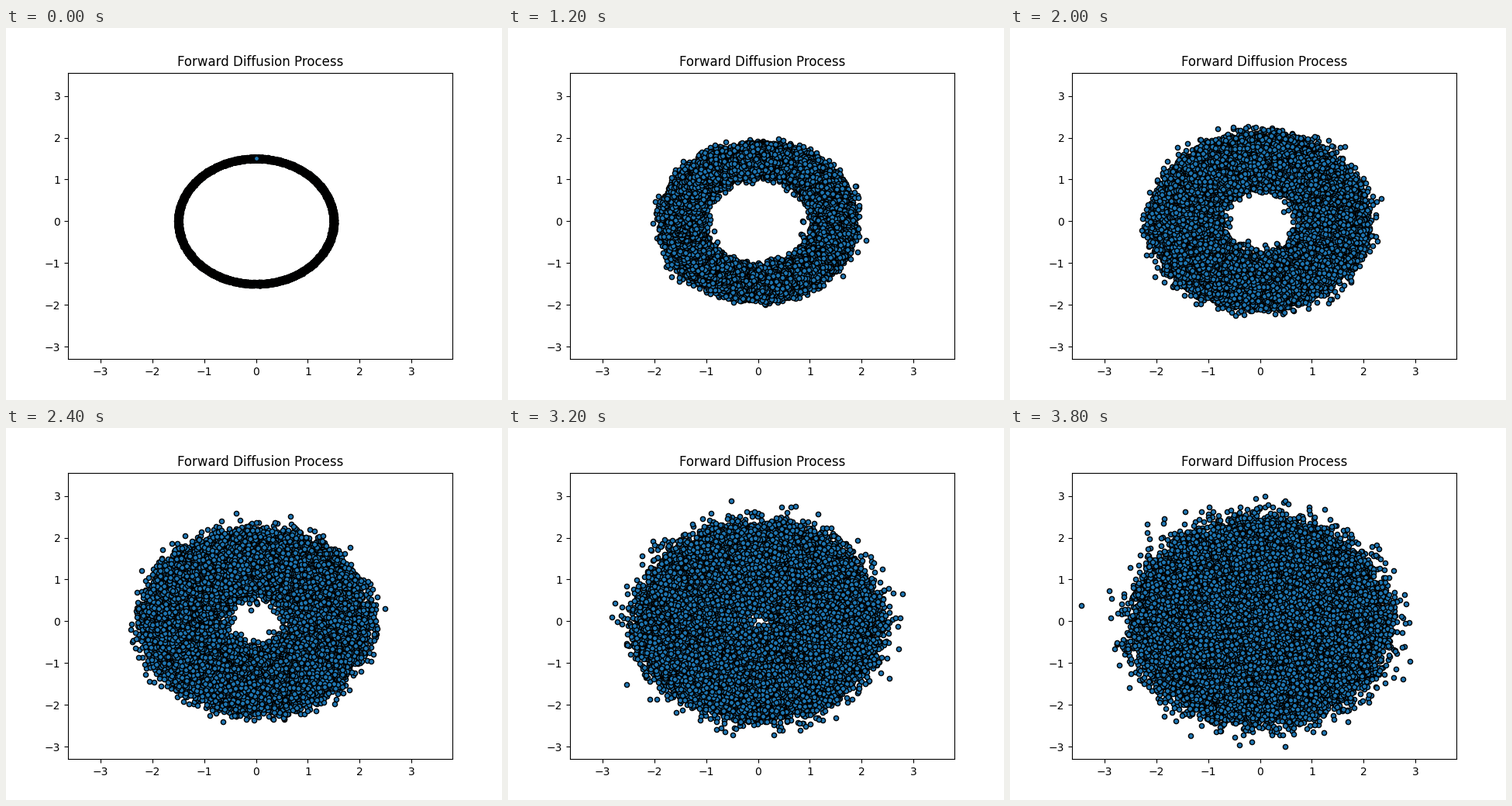
A matplotlib script for the animation above (4000 ms loop, 640x480 px).

```python
import numpy as np
import matplotlib.pyplot as plt
from matplotlib.animation import FuncAnimation

STEPS = 20
POINTS = 100_000
RADIUS = 1.5

rng = np.random.default_rng(7)
betas = np.linspace(1e-4, 0.02, STEPS)


def diffuse():
    """Noise a ring step by step and keep every state."""
    theta = np.linspace(0, 2 * np.pi, POINTS)
    x = RADIUS * np.column_stack([np.sin(theta), np.cos(theta)])
    states = []
    for beta in betas:
        x = np.sqrt(1 - beta) * x + np.sqrt(beta) * rng.standard_normal(x.shape)
        states.append(x)
    return states


states = diffuse()

fig, ax = plt.subplots(figsize=(6.4, 4.8), dpi=100)
ax.set_title("Forward Diffusion Process")
ax.set_xlim(-3.632, 3.793)
ax.set_ylim(-3.297, 3.556)
dots = ax.scatter(*states[0].T, s=20, c="C0", edgecolors="black", linewidths=1)


def update(step):
    dots.set_offsets(states[step])
    return (dots,)


anim = FuncAnimation(fig, update, frames=STEPS, interval=200,
                     repeat=True, repeat_delay=0)
plt.show()
```
